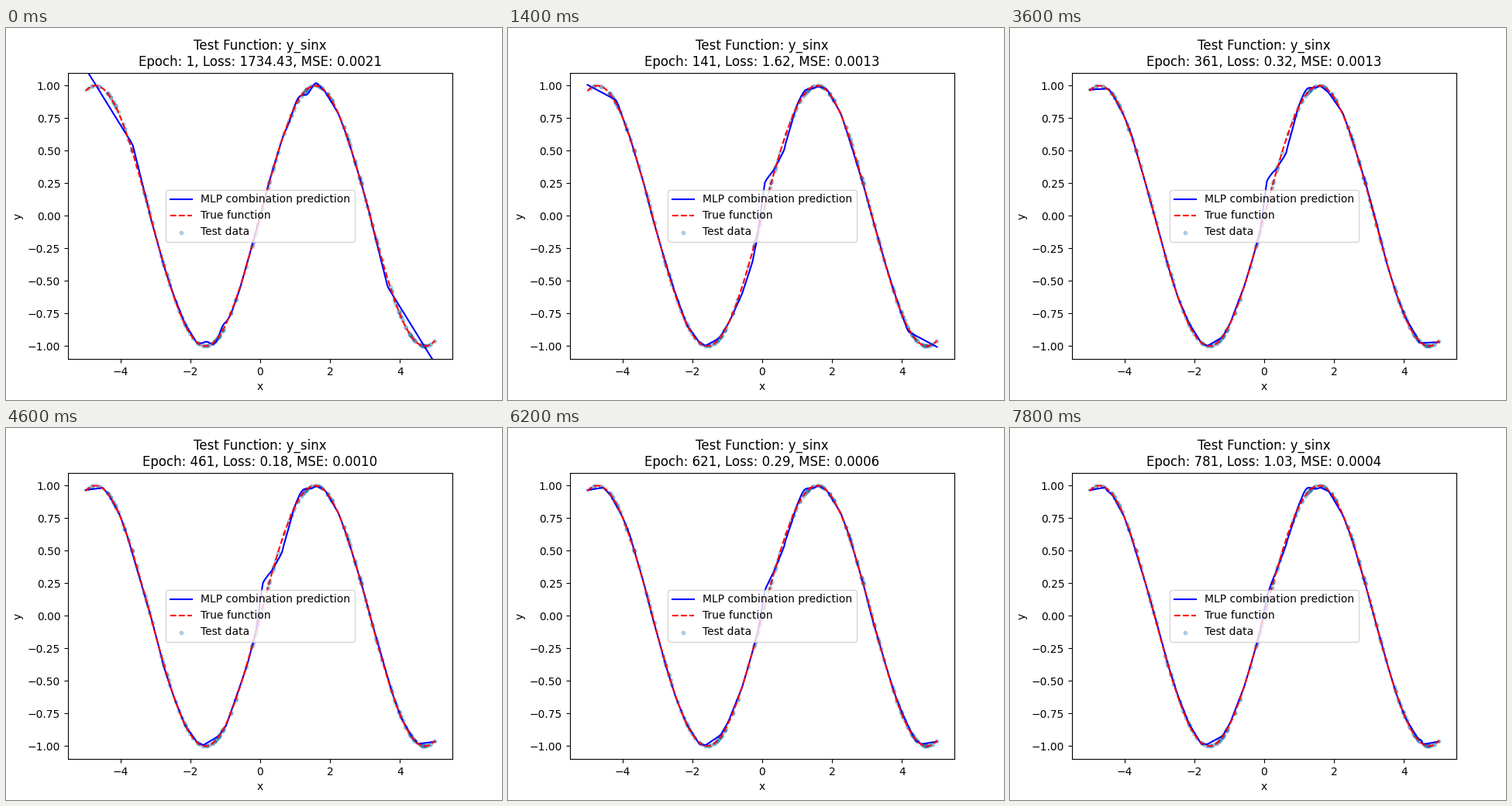
Write a matplotlib script that moves like this. It is 640 px wide and 480 px high and loops after 8 s.

```python
import numpy as np
import matplotlib.pyplot as plt
from matplotlib.animation import FuncAnimation

FRAMES, STEP_MS, EPOCHS = 40, 200, 20

# Measured checkpoints of the training run.
steps = [0, 7, 11, 18, 27, 35, 39]
losses = [1734.43, 1.62, 1.34, 0.32, 0.12, 0.64, 1.03]
errors = [0.0021, 0.0013, 0.0021, 0.0013, 0.0007, 0.0004, 0.0004]
jumps = [0, 0.18, 0.26, 0.2, 0.16, 0.09, 0.08]

rng = np.random.default_rng(4)
x = np.linspace(-5, 5, 200)
dots = np.sort(rng.uniform(-5, 5, 200))
knots = np.linspace(-5, 5, 33)
knots[1:-1] += rng.uniform(-0.08, 0.08, 31)
noise = rng.normal(0, 0.007, (FRAMES, knots.size))


def fade(step, span):
    return np.exp(-step / span)


def bend(at, height):
    """Piecewise linear bump that is zero outside its ends."""
    return np.interp(x, at, height)


def middle(step):
    """Jump at zero, the sag before it and the shoulder after it."""
    jump = np.interp(step, steps, jumps)
    sag = 0.1 * np.exp(-((step - 9) / 5) ** 2)
    shoulder = 0.055 * (1 - fade(step, 10))
    return (jump * bend([-0.12, 0.08, 0.32, 0.62, 1], [0, 1, 0.2, -0.48, 0])
            - sag * bend([-1, -0.27, -0.08], [0, 1, 0])
            + shoulder * bend([0.85, 1.15, 1.5], [0, 1, 0]))


def ripple(step):
    """Early overfitting around both inner crests."""
    r = np.abs(x)
    envelope = np.exp(-((r - 1.2) / 0.45) ** 2)
    return 0.035 * fade(step, 3) * envelope * np.cos(11.2 * (r - 1.06))


def add_tails(y, step):
    """Both ends run straight, and the straight part shrinks with training."""
    start = 4.55 - 0.9 * fade(step, 8)
    join = start - 0.5 * fade(step, 10)
    heights = [-np.sin(join),
               -np.sin(start) + 0.06 * fade(step, 10),
               0.965 + 0.168 * fade(step, 5)]
    r = np.abs(x)
    tail = -np.sign(x) * np.interp(r, [join, start, 5], heights)
    return np.where(r > join, tail, y)


def predict(step):
    y = np.interp(x, knots, np.sin(knots) + noise[step])
    return add_tails(y + middle(step) + ripple(step), step)


fig, ax = plt.subplots(figsize=(6.4, 4.8), dpi=100)
fit_line, = ax.plot(x, predict(0), color="blue",
                    label="MLP combination prediction")
ax.plot(x, np.sin(x), color="red", ls="--", label="True function")
ax.scatter(dots, np.sin(dots), s=10, alpha=0.3, label="Test data")
ax.set(xlim=(-5.5, 5.5), ylim=(-1.1, 1.1), xlabel="x", ylabel="y")
ax.legend(loc="center")
title = ax.set_title("")


def draw(step):
    epoch = 1 + EPOCHS * step
    fit_line.set_ydata(predict(step))
    # Loss falls as a power of the epoch between checkpoints.
    loss = np.exp(np.interp(np.log(epoch),
                            np.log(1 + EPOCHS * np.array(steps)),
                            np.log(losses)))
    mse = np.interp(step, steps, errors)
    title.set_text("Test Function: y_sinx\n"
                   f"Epoch: {epoch}, Loss: {loss:.2f}, MSE: {mse:.4f}")
    return fit_line, title


anim = FuncAnimation(fig, draw, frames=FRAMES, interval=STEP_MS,
                     repeat=True, repeat_delay=0)
plt.show()
```
